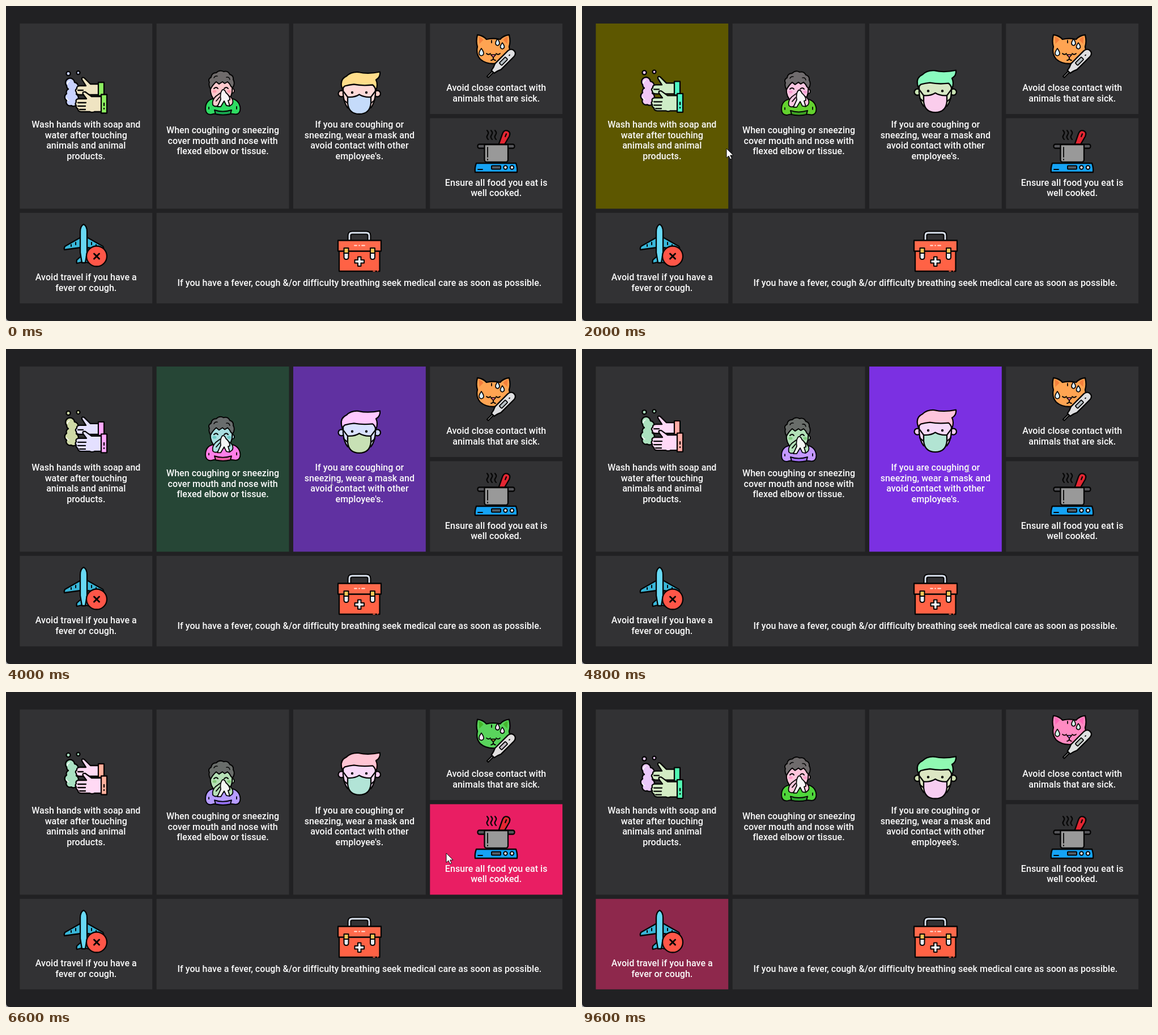
Write an HTML page that moves like this. It is 1006 px wide and 557 px high and loops after 9800 ms.

```html
<!DOCTYPE html>
<html lang="en">
<head>
<meta charset="utf-8">
<title>Health tips</title>
<style>
html, body { margin: 0; width: 100%; height: 100%; overflow: hidden; background: #212123; }
svg { display: block; width: 1006px; height: 557px; }
text { font: 500 16px Roboto, "Open Sans", sans-serif; letter-spacing: .045px; fill: #fafafa; text-anchor: middle; }
.icon { stroke: #050505; stroke-width: 2.3; stroke-linejoin: round; stroke-linecap: round; }
.line { fill: none; }
.flat { stroke: none; }
</style>
</head>
<body>
<svg viewBox="0 0 1006 557">
  <path d="M0 550Q0 557 7 557H0Z" fill="#b5b5b7"/>
  <g id="cards"></g>

  <g id="hands" class="icon">
    <g fill="#c8d2ff">
      <circle cx="110" cy="119.500" r="3.600"/>
      <circle cx="127.500" cy="118" r="3"/>
      <path d="M107 141a8 8 0 1 1 14-6a7.500 7.500 0 0 1 4 13a6 6 0 0 1-1 8a7 7 0 0 1 2 11a7.500 7.500 0 0 1-11 9a6.500 6.500 0 0 1-8-9a7 7 0 0 1 0-12a6 6 0 0 1 3-8a7 7 0 0 1-3-6Z"/>
    </g>
    <path d="M172 138H149L138 127q-5-2-4 3l7 11h-11q-6 1-5 5q-4 3-1 6q0 5 6 5H172Z" fill="#efe4c2"/>
    <path d="M163 135h10v24h-10z" fill="#8cee60"/>
    <path d="M169 160H151l-11-8q-6-1-4 4l6 8h-14q-6 1-4 6q-3 3 0 6q-1 4 3 6q0 5 6 5h15q4 2 8 0h13Z" fill="#efe4c2"/>
    <path d="M168 156.500h10v33h-10z" fill="#8cee60"/>
    <path class="line" d="M127 149h9M127 171h14M127 177h13M130 183h10M173 172v4M173 181v1"/>
    <path class="line" d="M108 138q1-4 4-5M107 163q1 4 4 4" stroke="#fff" stroke-width="1.500"/>
  </g>

  <g id="boy" class="icon">
    <g stroke-width="2">
    <path d="M352 182q0-15 13-18l10-1h20q17 2 18.500 18q0 10-8 10.500l-8-1q-14 3-30 0l-6 1.500q-9 0-9.500-10Z" fill="#2edb62"/>
    <path d="M368 184q14 5 30 0l-2 7q-13 3-26 0Z" fill="#18a851"/>
    <circle cx="399" cy="150" r="4" fill="#ffc8cc"/>
    <path d="M362 137q18-9 36 0q4 17-4 27q-14 9-28 0q-8-11-4-27Z" fill="#ffc8cc"/>
    <path d="M361 147q-4-7-2-12q-3-6 3-9q1-8 9-8q6-6 13-2q8-2 11 5q7 2 6 9q4 7-1 15l-3-3q-2-5-6-8l-5 3l-4-3l-6 4l-5-4q-6 5-10 13Z" fill="#6f6b6b"/>
    </g>
    <path class="line" d="M367 127q2-4 6-3M389 126q5-1 6 4" stroke-width="1.500"/>
    <path class="line" d="M367 146q4-4 7 0M385 146q4-4 7 0" stroke-width="2"/>
    <g class="flat" fill="#ff9fae"><ellipse cx="368" cy="151" rx="3.500" ry="2.500"/><ellipse cx="394" cy="151" rx="3.500" ry="2.500"/></g>
    <g stroke-width="1.800">
    <path d="M378 154l-8 6q-7 7-5 15q5 5 10 0l7-9l2-6q0-6-6-6Z" fill="#ffc8cc"/>
    <path d="M389 157q8 2 11 9q2 7-4 10q-6 0-8-7q-3-8 1-12Z" fill="#ffc8cc"/>
    <path d="M382 148q4-1 6 5q8 7 7 13l-3 1l3 10l-6-1l-4-8l-6 10l-6 0l6-13q-2-11 3-17Z" fill="#f7f5f5"/>
    <path class="line" d="M371 168l6-7M358 182v-3M407 182v-4"/>
    </g>
  </g>

  <g id="mask" class="icon">
    <circle cx="592" cy="155" r="5.500" fill="#ffcfc9"/>
    <circle cx="655.500" cy="155" r="5.500" fill="#ffcfc9"/>
    <path d="M595 137h57v18q-1 16-8 25h-41q-7-9-8-25Z" fill="#ffdad8"/>
    <path d="M594 149l-2-8q-2-12 9-17q8-8 21-7q17 4 38-.5q1 10-7 14q4 8 0 19q-2-7-6-10q-18 2-33-1q-9 1-16 3q-4 3-4 7.500Z" fill="#ffdd8a"/>
    <path d="M603 161q12 1 20.500-4.500q9 5.500 20.500 4.500v11q-2 19-20.500 19q-18.500 0-20.500-19Z" fill="#c5dbfa"/>
    <path class="line" d="M594 149l9 12M653 149l-9 12M596 166l7 6M651 166l-7 6"/>
    <g class="flat" fill="#050505"><circle cx="611" cy="153" r="2.200"/><circle cx="636" cy="153" r="2.200"/></g>
  </g>

  <g id="cat" class="icon">
    <path d="M832 51q10 1 16 8q12-3 24 0q6-7 16-8q3 12 0 21q3 13-5 22q-9 8-23 8q-14 0-23-8q-8-9-5-22q-3-9 0-21Z" fill="#ffa452"/>
    <path class="flat" d="M834.500 54q5 1 8 6l-7 7ZM885.500 54q-5 1-8 6l7 7Z" fill="#f5803c"/>
    <path class="line" d="M848 84q3.500 3.500 7 0M865 84q3.500 3.500 7 0M860 91v2q-1 3-4 3M860 93q1 3 4 3M857 61v4" stroke-width="1.800"/>
    <path d="M855.500 86h9l-4.500 5Z" fill="#ff789a" stroke-width="1.600"/>
    <g fill="#d9f0ff" stroke-width="1.700">
      <path d="M839 75q8 11 0 13q-8-2 0-13Z"/>
      <path d="M867.500 58q7 10 0 12q-7-2 0-12Z"/>
      <path d="M876 65q7 9 0 11q-7-2 0-11Z"/>
    </g>
    <g transform="translate(850 125.500) rotate(-45)" fill="#dfdfe1">
      <path d="M0-1.500h13v3H0Z"/>
      <path d="M13-3.500q7-1 13-4h32q8 1 8 7.500q0 7-8 7.500H26Q20 4.500 13 3.500Z"/>
      <rect x="32" y="-3" width="15" height="6" rx="1" fill="#b7bfc4" stroke-width="1.800"/>
      <path class="line" d="M54 0h1" stroke-width="2"/>
    </g>
  </g>

  <g id="pot" class="icon">
    <path class="line" d="M849 220q4 4 1 8t1 8M856 220q4 4 1 8t1 8M863 220q4 4 1 8t1 8" stroke-width="2.200"/>
    <g transform="translate(873 247) rotate(22)" fill="#e32632">
      <path d="M-4 0l-1-21q0-8 6.500-8q6.500 0 6.500 8L5 0Z"/>
      <path class="line" d="M1.500-23v5" stroke-width="2.200"/>
    </g>
    <rect x="832.500" y="244.500" width="65" height="7" rx="3" fill="#56565a"/>
    <path d="M844.500 245h41.500v27q0 4-5 4h-31.500q-5 0-5-4Z" fill="#999"/>
    <path class="line" d="M850 250v17M850 271v1" stroke="#050505" stroke-width="1.800"/>
    <path d="M830 278h70q3 8 2 16h-74q-1-8 2-16Z" fill="#15a3f5"/>
    <rect x="857" y="282.500" width="16" height="6" rx="1" fill="#54616b" stroke-width="2"/>
    <g fill="#e8f4ff" stroke-width="2"><circle cx="881.500" cy="285.500" r="3.200"/><circle cx="893" cy="285.500" r="3.200"/></g>
    <path class="line" d="M833 289h8" stroke-width="1.800"/>
  </g>

  <g id="plane" class="icon">
    <path d="M132 409L104 425q-2 3-1 6l29-4ZM143 409l28 16q2 3 1 6l-29-4Z" fill="#38b6d8"/>
    <path d="M133 442l-8 7q-1 4 0 6l12-3l12 3v-6l-8-7Z" fill="#38b6d8"/>
    <path d="M131 399q0-10 6-13q6 3 6 13v37l-3 18h-6l-3-18Z" fill="#68d9f4"/>
    <path class="line" d="M115 422v3M123 418v4M151 418v4M159 422v3" stroke-width="2"/>
    <circle cx="160" cy="442.500" r="18" fill="#ff5648"/>
    <path class="line" d="M155.500 438l9 9M164.500 438l-9 9" stroke-width="3"/>
  </g>

  <g id="kit" class="icon">
    <path class="line" d="M606 414v-8q0-5 5-5h25q5 0 5 5v8" stroke-width="7" stroke-linecap="butt"/>
    <path class="line" d="M606 414v-8q0-5 5-5h25q5 0 5 5v8" stroke="#dbe3f0" stroke-width="2.800" stroke-linecap="butt"/>
    <path d="M588 433h71.500v36h-71.500Z" fill="#ff6245"/>
    <path d="M586 414.500h76v19h-76Z" fill="#ff6a4c"/>
    <path class="line" d="M615 423.500h4M623 423.500h1M628 423.500h5" stroke="#ffe0d8" stroke-width="1.800"/>
    <g id="clasp" stroke-width="2">
      <path d="M596.500 428h8v10h-8Z" fill="#ffc757"/>
      <path d="M596.500 437h8v7q0 4-4 4t-4-4Z" fill="#e8edf5"/>
    </g>
    <use href="#clasp" x="46.500"/>
    <path d="M621 443.500h5.500v5.500h5.500v5.500h-5.500v5.500h-5.500v-5.500h-5.500v-5.500h5.500Z" fill="#f5f5f7" stroke-width="2"/>
    <path class="line" d="M648 469h3M656 463v6" stroke="#ff6245" stroke-width="1.500"/>
  </g>

  <g id="labels"></g>
  <path id="arrow" d="M0 0V16.500L4 13L6.700 19L9.300 17.800L6.700 12H12Z" fill="#fff" stroke="#111" stroke-width="1"/>
  <path id="beam" d="M-3-6q3 0 3 2v8q0 2-3 2M3-6q-3 0-3 2M3 6q-3 0-3-2" fill="none" stroke="#c9c9c9" stroke-width="1"/>
</svg>
<script>
const LOOP = 9800, STEP = 200, FADE = 400;
const GREY = [50, 50, 52], PINK = [233, 30, 99];
const W = 233.8, TALL = 327.4, LOW = 160;
const X = [0, 1, 2, 3].map(i => 24.4 + i * 241.3);
const Y = [0, 1, 2].map(i => 31 + i * 167.4);

// box, hover colour, hover spans, first baseline, lines of text
const cards = [
  { box: [X[0], Y[0], W, TALL], hot: [93, 87, 0], on: [[1000, 2050]], y: 215.3,
    text: ["Wash hands with soap and", "water after touching", "animals and animal", "products."] },
  { box: [X[1], Y[0], W, TALL], hot: [2, 128, 61], on: [[2100, 3700]], y: 225,
    text: ["When coughing or sneezing", "cover mouth and nose with", "flexed elbow or tissue."] },
  { box: [X[2], Y[0], W, TALL], hot: [123, 48, 226], on: [[3750, 5150]], y: 215.3,
    text: ["If you are coughing or", "sneezing, wear a mask and", "avoid contact with other", "employee's."] },
  { box: [X[3], Y[0], W, LOW], hot: PINK, on: [[5200, 6050]], y: 150.3,
    text: ["Avoid close contact with", "animals that are sick."] },
  { box: [X[3], Y[1], W, LOW], hot: PINK, on: [[6100, 6900]], y: 317.8,
    text: ["Ensure all food you eat is", "well cooked."] },
  { box: [X[0], Y[2], W, LOW], hot: PINK, on: [[500, 950], [8750, 9400]], y: 485.3,
    text: ["Avoid travel if you have a", "fever or cough."] },
  { box: [X[1], Y[2], 716.4, LOW], hot: PINK, on: [[6950, 8700]], y: 495,
    text: ["If you have a fever, cough &/or difficulty breathing seek medical care as soon as possible."] }
];

// time, x, y of the pointer
const path = [
  [400, 8, 540], [800, 80, 420], [1200, 135, 320], [1600, 195, 285], [2000, 255, 252],
  [2600, 320, 255], [3200, 368, 256], [4000, 575, 235], [4800, 681, 211], [5150, 744, 165],
  [5500, 800, 130], [6000, 850, 185], [6200, 840, 240], [6600, 777, 285], [6950, 750, 366],
  [7300, 690, 410], [8000, 488, 420], [8700, 262, 435], [9200, 150, 460], [9400, 110, 475]
];

const $ = id => document.getElementById(id);
const clamp = v => Math.max(0, Math.min(1, v));
const mix = (a, b, k) => a + (b - a) * k;

function add(parent, tag, attrs) {
  const el = document.createElementNS("http://www.w3.org/2000/svg", tag);
  for (const k in attrs) el.setAttribute(k, attrs[k]);
  return $(parent).appendChild(el);
}

for (const c of cards) {
  const [x, y, width, height] = c.box;
  c.rect = add("cards", "rect", { x, y, width, height });
  c.text.forEach((line, i) => {
    add("labels", "text", { x: x + width / 2, y: c.y + i * 18.5 }).textContent = line;
  });
}

// Rests until TURN, then swings between 0 and 360 degrees, 5 s each way
const SWING = 5000, TURN = 736;
function swing(t) {
  const u = Math.max(0, t - TURN) % (2 * SWING);
  return 360 * (u < SWING ? u : 2 * SWING - u) / SWING;
}

// Hue and height move together; rest is the phase already in the drawn colours
function pose(id, phase, rest = 0, dir = 1) {
  const hue = dir * Math.max(0, phase - rest), el = $(id);
  el.setAttribute("transform", `translate(0 ${-hue * 11 / 360})`);
  el.style.filter = `hue-rotate(${hue}deg)`;
}

function pointer(t) {
  const i = path.findIndex(p => p[0] > t);
  const shown = i > 0;
  let x = 0, y = 0, beam = false;
  if (shown) {
    const a = path[i - 1], b = path[i], k = (t - a[0]) / (b[0] - a[0]);
    x = mix(a[1], b[1], k);
    y = mix(a[2], b[2], k);
    beam = y > 202 && y < 272 && (x > 283 && x < 481 || x > 545 && x < 703);
  }
  for (const [id, on] of [["arrow", shown && !beam], ["beam", beam]]) {
    $(id).setAttribute("visibility", on ? "visible" : "hidden");
    $(id).setAttribute("transform", `translate(${x} ${y})`);
  }
}

function draw(ms) {
  const t = Math.floor((ms % LOOP) / STEP) * STEP;
  for (const c of cards) {
    const k = Math.max(...c.on.map(([a, b]) => Math.min(clamp((t - a) / FADE), 1 - clamp((t - b) / FADE))));
    c.rect.setAttribute("fill", `rgb(${GREY.map((g, i) => Math.round(mix(g, c.hot[i], k)))})`);
  }
  const phase = swing(t);
  pose("hands", phase, 36);
  pose("boy", phase, 62, -1);
  pose("mask", phase);
  pose("cat", (t - 5420) * 360 / SWING);
  pointer(t);
}

let start;
function tick(now) {
  start ??= now;
  draw(now - start);
  requestAnimationFrame(tick);
}
draw(0);
requestAnimationFrame(tick);
</script>
</body>
</html>
```
